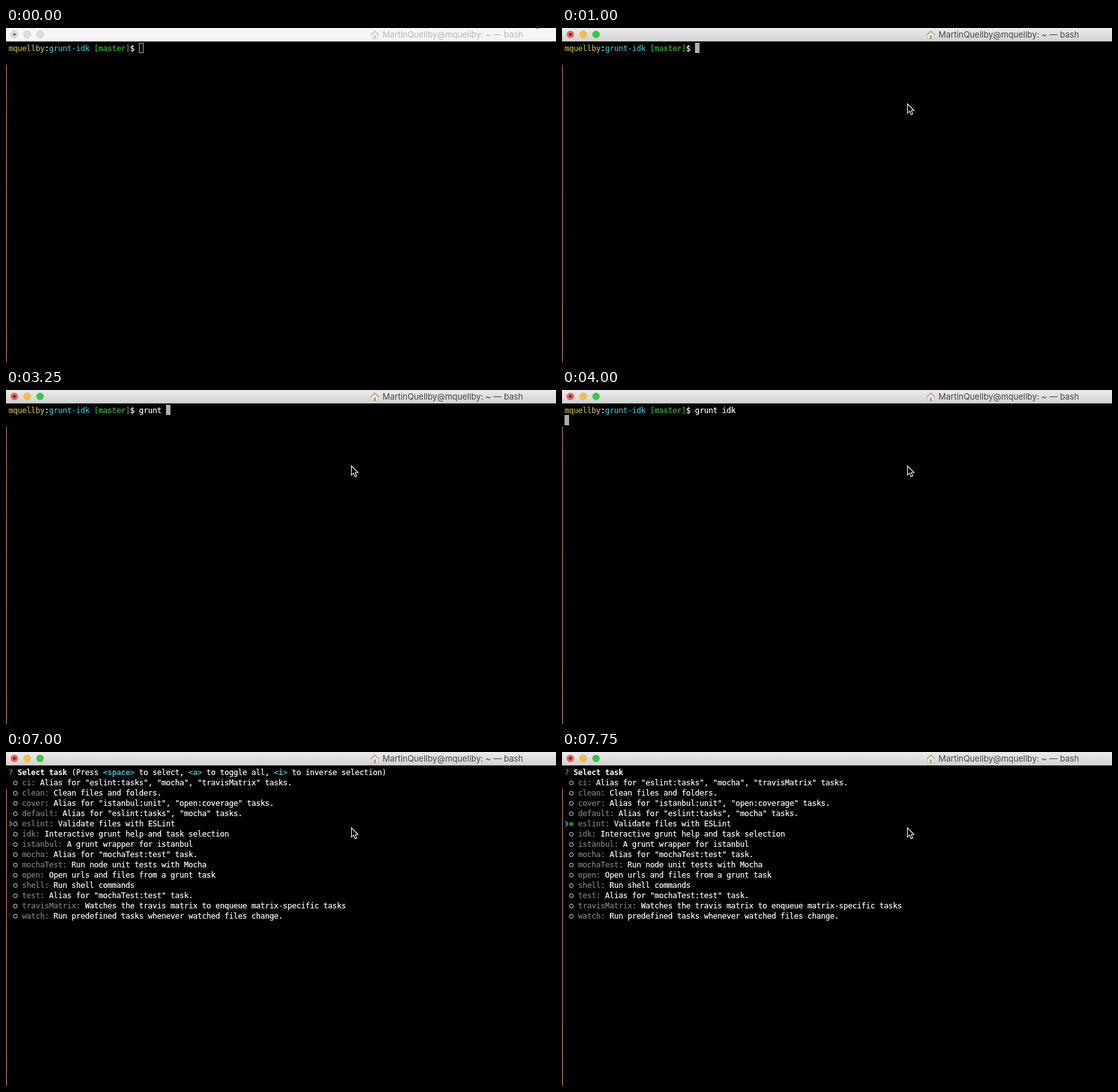
These frames come from a looping animation (856 px wide and 521 px high, 8 s). An HTML page:

```html
<!DOCTYPE html>
<html lang="en">
<head>
<meta charset="utf-8">
<title>Terminal task picker</title>
<style>
html, body { margin: 0; width: 100%; height: 100%; overflow: hidden; background: #000; }
#stage {
  position: relative; width: 856px; height: 521px; overflow: hidden; background: #000;
  color: #fff; font: 12px/16px "DejaVu Sans Mono", monospace; white-space: pre;
  letter-spacing: calc(7px - 1ch); /* snap glyphs to the 7px terminal cell */
}
#stage > *, .line, svg { position: absolute; left: 0; top: 0; }
#stage * { animation-duration: 8s; animation-timing-function: step-end; animation-iteration-count: infinite; }

.bar { width: 856px; height: 21px; background: #f6f6f6; color: #b6b6b6; }
.bar.active {
  background: linear-gradient(#ebebeb, #d2d2d2); box-shadow: inset 0 -1px #c4c4c4;
  color: #464646; animation-name: activate;
}
.bar span { position: absolute; left: 586px; top: 2px; font: 12.9px/17px Inter, sans-serif; letter-spacing: normal; }

.line { left: 4px; -webkit-text-stroke: .2px; }
b { -webkit-text-stroke: 0; }
b.key { color: #3fb9cb; }
.user { color: #bdb63a; }
.path { color: #3cbfd2; }
.ok { color: #35be38; }
.dim { color: #808080; }

#shell { animation-name: shell; }
#typed { left: 207px; top: 24px; animation-name: type; }
#caret { animation-name: caret; }
#hollow { animation-name: hollow; }
#list { animation-name: list; }
.hint, .unpicked { animation-name: hint; }
#arrow { animation-name: arrow; }
.picked { animation-name: picked; }
#pointer { animation-name: pointer; }

@keyframes activate { 0% { opacity: 0 } 12.5%, 100% { opacity: 1 } }
@keyframes shell { 0% { opacity: 1 } 65.625%, 100% { opacity: 0 } }
@keyframes hollow { 0% { opacity: 1 } 12.5%, 100% { opacity: 0 } }
@keyframes type {
  0% { clip-path: inset(0 63px 0 0) }
  31.25% { clip-path: inset(0 49px 0 0) }
  34.375% { clip-path: inset(0 35px 0 0) }
  37.5% { clip-path: inset(0 28px 0 0) }
  40.625% { clip-path: inset(0 21px 0 0) }
  43.75% { clip-path: inset(0 7px 0 0) }
  46.875%, 100% { clip-path: inset(0) }
}
@keyframes caret {
  0% { transform: translate(207px, 23px); opacity: 0 }
  12.5% { transform: translate(207px, 23px); opacity: 1 }
  31.25% { transform: translate(221px, 23px) }
  34.375% { transform: translate(235px, 23px) }
  37.5% { transform: translate(242px, 23px) }
  40.625% { transform: translate(249px, 23px) }
  43.75% { transform: translate(263px, 23px) }
  46.875% { transform: translate(270px, 23px) }
  50%, 100% { transform: translate(4px, 39px); opacity: 1 }
}
@keyframes list { 0% { opacity: 0 } 65.625% { opacity: 1 } 90.625% { opacity: 0 } 96.875%, 100% { opacity: 1 } }
@keyframes hint { 0% { opacity: 1 } 96.875%, 100% { opacity: 0 } }
@keyframes picked { 0% { opacity: 0 } 96.875%, 100% { opacity: 1 } }
@keyframes arrow {
  0% { transform: translateY(0) }
  84.375% { transform: translateY(16px) }
  87.5%, 100% { transform: translateY(64px) }
}
@keyframes pointer {
  0% { transform: translate(820px, -16px) }
  6.25% { transform: translate(603px, 105px) }
  9.375%, 100% { transform: translate(537px, 117px) }
}
</style>
</head>
<body>
<div id="stage">
  <div id="shell">
    <div class="line" style="top:24px"><span class="user">mquellby</span>:<span class="path">grunt-idk</span> <span class="ok">[master]</span>$</div>
    <div id="typed" class="line">grunt idk</div>
    <svg width="856" height="521">
      <rect id="hollow" x="207.5" y="23.5" width="6" height="15" fill="none" stroke="#b4b4b4"/>
      <rect id="caret" width="7" height="16" fill="#aeaeae"/>
    </svg>
  </div>

  <div id="list">
    <div class="line" style="top:24px"><span class="ok">?</span> <b>Select task</b><span class="hint"> (Press <b class="key">&lt;space&gt;</b> to select, <b class="key">&lt;a&gt;</b> to toggle all, <b class="key">&lt;i&gt;</b> to inverse selection)</span></div>
    <svg width="856" height="521" fill="none">
      <g id="marks" stroke="#eee"></g>
      <g class="picked" stroke="#35be38">
        <circle cx="14.5" cy="112.3" r="3"/>
        <circle cx="14.5" cy="112.3" r="1.7" fill="#35be38" stroke="none"/>
      </g>
      <path id="arrow" d="M5.7 44.3 8.7 48.2 5.7 52.1" stroke="#3fb9cb" stroke-width="1.7"/>
    </svg>
  </div>

  <svg width="2" height="521">
    <defs><linearGradient id="edge" x2="0" y2="1"><stop stop-color="#d98f6c"/><stop offset="1" stop-color="#dfa062"/></linearGradient></defs>
    <path d="M0 56Q1 57 1 60V521H0Z" fill="url(#edge)"/>
  </svg>

  <div class="bar">
    <svg width="856" height="21">
      <g fill="#dedede" stroke="#cbcbcb"><circle cx="13" cy="10" r="5.5"/><circle cx="33" cy="10" r="5.5"/><circle cx="53" cy="10" r="5.5"/></g>
      <circle cx="13" cy="10" r="2" fill="#686868"/>
      <use href="#house" opacity=".55"/>
    </svg>
    <span>MartinQuellby@mquellby: ~ — bash</span>
  </div>
  <div class="bar active">
    <svg width="856" height="21">
      <g stroke="#000" stroke-opacity=".1">
        <circle cx="13" cy="10" r="5.6" fill="#fb5a55"/>
        <circle cx="33" cy="10" r="5.6" fill="#fdbc40"/>
        <circle cx="53" cy="10" r="5.6" fill="#34c84a"/>
      </g>
      <circle cx="13" cy="10" r="2" fill="#4c0805"/>
      <g id="house">
        <path d="M569 10.5 574 6 579 10.5V17H569Z" fill="#f1eee8" stroke="#b9b3a8" stroke-width=".7"/>
        <path d="M572.5 17V11.5H575.5V17Z" fill="#b98e62"/>
        <path d="M567.5 11 574 4.8 580.5 11" fill="none" stroke="#b8a58f" stroke-width="1.7"/>
      </g>
    </svg>
    <span>MartinQuellby@mquellby: ~ — bash</span>
  </div>

  <svg id="pointer" width="14" height="21">
    <path d="M.6 1.4V15.8L4 12.6 6.3 18.2 8.8 17.1 6.6 11.8H11Z" fill="#000" stroke="#fff" stroke-width="1.1"/>
  </svg>
</div>

<script>
const tasks = [
  'ci: Alias for "eslint:tasks", "mocha", "travisMatrix" tasks.',
  'clean: Clean files and folders.',
  'cover: Alias for "istanbul:unit", "open:coverage" tasks.',
  'default: Alias for "eslint:tasks", "mocha" tasks.',
  'eslint: Validate files with ESLint',
  'idk: Interactive grunt help and task selection',
  'istanbul: A grunt wrapper for istanbul',
  'mocha: Alias for "mochaTest:test" task.',
  'mochaTest: Run node unit tests with Mocha',
  'open: Open urls and files from a grunt task',
  'shell: Run shell commands',
  'test: Alias for "mochaTest:test" task.',
  'travisMatrix: Watches the travis matrix to enqueue matrix-specific tasks',
  'watch: Run predefined tasks whenever watched files change.'
];
const rowHeight = 16, pickedRow = 4;
const list = document.getElementById('list');
const marks = document.getElementById('marks');

tasks.forEach((task, row) => {
  const split = task.indexOf(':') + 1;
  const line = document.createElement('div');
  const name = document.createElement('span');
  line.className = 'line';
  line.style.top = 40 + row * rowHeight + 'px';
  name.className = 'dim';
  name.textContent = '   ' + task.slice(0, split);
  line.append(name, task.slice(split));
  list.append(line);

  const mark = document.createElementNS(marks.namespaceURI, 'circle');
  mark.setAttribute('cx', 14.5);
  mark.setAttribute('cy', 48.3 + row * rowHeight);
  mark.setAttribute('r', 3);
  if (row === pickedRow) mark.setAttribute('class', 'unpicked');
  marks.append(mark);
});
</script>
</body>
</html>
```
